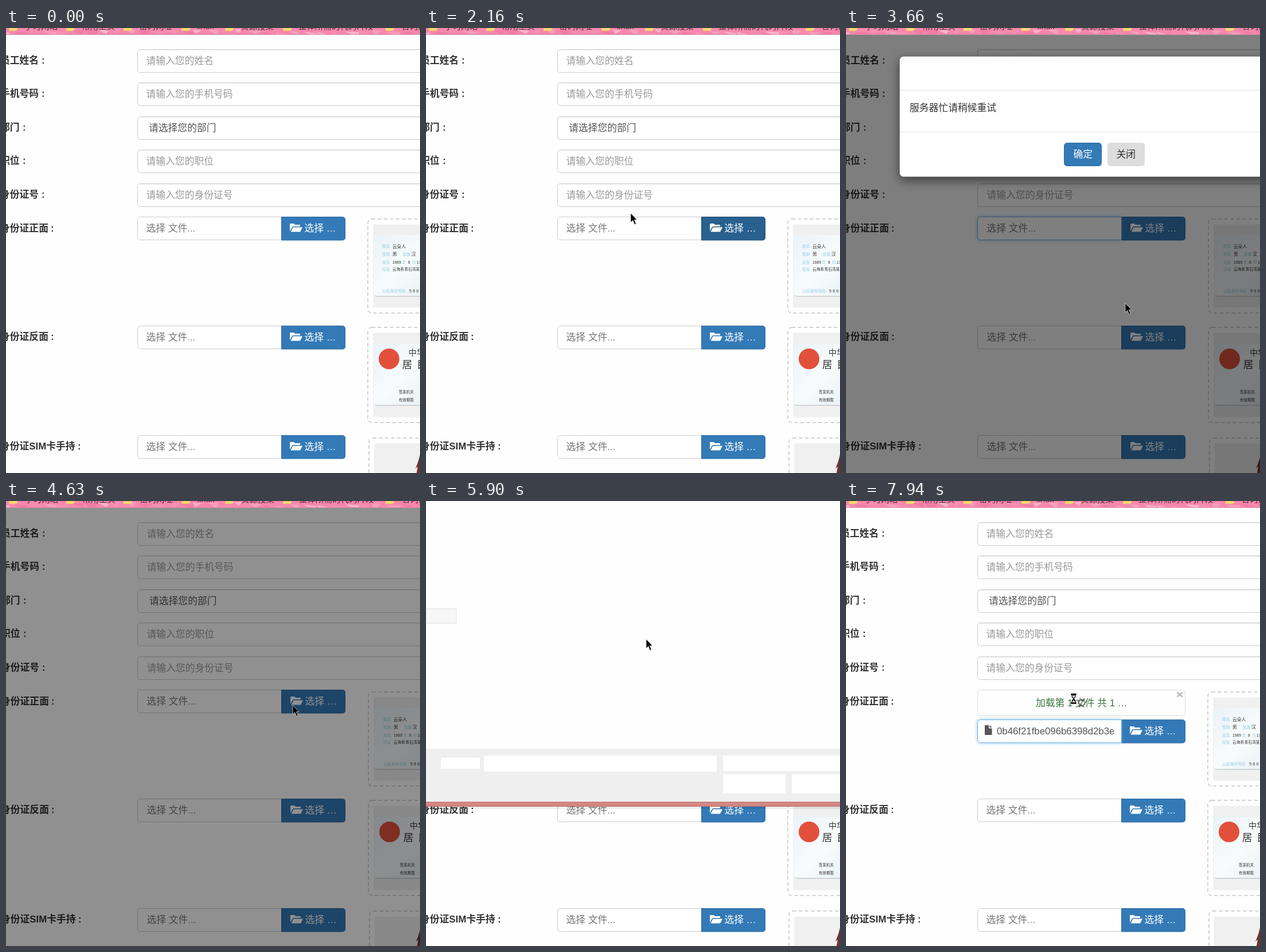
An HTML page that plays this animation: 722x776 px, repeating every 8 s.

```html
<!DOCTYPE html>
<html lang="zh-CN">
<head>
<meta charset="utf-8">
<style>
  html, body { margin: 0; width: 100%; height: 100%; overflow: hidden; background: #fefefe; }
  svg { display: block; width: 722px; height: 776px; }
  text { font: 16.8px "Liberation Sans", "Noto Sans CJK SC", "Noto Sans CJK", sans-serif; white-space: pre; }
  .label { font-weight: bold; fill: #333; }
  .field { fill: #fff; stroke: #ccc; }
  .focus { stroke: #66afe9; filter: drop-shadow(0 0 3px #66afe9aa); }
  .btn { fill: #337ab7; stroke: #2e6da4; }
  .btn.on { fill: #286090; stroke: #204d74; }
  .dim text, .dim .thumb, .dim .icon { transform: translateX(1px); }
</style>
</head>
<body>
<svg id="stage" viewBox="0 0 722 776"></svg>
<script>
const stage = document.getElementById('stage');
const $ = id => document.getElementById(id);

const text = (x, y, s, fill, size = 16.8, extra = '') =>
  `<text x="${x}" y="${y}" fill="${fill}" style="font-size:${size}px" ${extra}>${s}</text>`;
const rect = (x, y, w, h, fill, extra = '') =>
  `<rect x="${x}" y="${y}" width="${w}" height="${h}" fill="${fill}" ${extra}/>`;

// The colon sits apart from the words, as a full-width sign does
const label = (y, s, colon) =>
  `<text class="label" x="-10" y="${y}">${s}</text><text class="label" x="${colon - 4}" y="${y}">:</text>`;

const inputRow = (y, name, colon, hint, x = 244.5, fill = '#999') =>
  label(y + 25, name, colon) +
  `<rect class="field" x="229.5" y="${y + .5}" width="520" height="40" rx="5"/>
   <path d="M233 ${y + 1.5}H722" stroke="#eee"/>` +
  text(x, y + 25.5, hint, fill);

const folder = y => `<path class="icon" fill="#fff" d="M495 ${y + 25}v-12q0-1 1-1h6l2 2h8q1 0 1 1v2h-12q-1 0-2 1z
  M500.5 ${y + 18.5}h16.5l-4 8h-16.5z"/>`;

const fileBox = (y, id) => `<g id="row${id}">
  <path id="btn${id}" class="btn" d="M480.5 ${y + .5}H586.5q5 0 5 5v30.500q0 5-5 5H480.5z"/>
  <path id="field${id}" class="field" d="M480 ${y + .5}H234.5q-5 0-5 5v30q0 5 5 5H480"/>
  <path id="edge${id}" d="M480.500 ${y}v41" stroke="#2e6da4"/>
  <g id="hint${id}">${text(244.5, y + 26, '选择 文件...', '#777')}</g>
  ${folder(y)}${text(520.5, y + 26, '选择 …', '#fff')}</g>`;

const thumb = (x, y, h, body) => `<g class="thumb">
  <rect x="${x + 1}" y="${y + 1}" width="200" height="${h}" rx="7" fill="#fff" stroke="#d2d2d2" stroke-width="2" stroke-dasharray="6 4.5"/>
  ${rect(x + 10, y + 10.5, 100, h - 19, '#f0f0f0')}${body}</g>`;

const card = y => rect(642, y + 1, 110, 107, '#cfd4d6', 'rx="6"') +
  rect(641, y, 110, 106, 'url(#card)', 'rx="6"');

const small = (y, size, ...parts) => parts.map(([x, s, blue]) =>
  text(x, y, s, blue ? '#8ccbe0' : '#333', size, 'font-weight="bold"')).join('');

function topBar() {
  let seed = 7, tiles = '';
  const random = () => (seed = seed * 16807 % 2147483647) / 2147483647;
  for (let x = -10; x < 722; x += 24) {
    const color = ['#fdb3ca', '#f47ba6', '#fa9dbd', '#f78fb2'][random() * 4 | 0];
    tiles += `<path fill="${color}" d="M${x} ${random() * 8}l${14 + random() * 14} ${random() * 4}l-${random() * 12} ${5 + random() * 7}z"/>`;
  }
  const marks = [[5, '学习网站'], [105, '常用主页'], [205, '密码网址'], [306, 'linux'],
    [382, '资源搜集'], [483, '整体所需的代码片段'], [662, '名词讲解']];
  const items = marks.map(([x, s]) => `<path d="M${x} -3h15v6l-3 2h-12z" fill="#f8d775" stroke="#e2b860" stroke-width=".6"/>` +
    text(x + 27, 1.5, s, '#4a3038', 14.5)).join('');
  return `<g clip-path="url(#bar)">${rect(0, 0, 722, 12, '#f887ae')}${tiles}${items}
    ${rect(0, 11, 722, 1, '#d98aa2')}</g>`;
}

const page = `<g id="page">${topBar()}
  ${inputRow(37, '员工姓名', 66, '请输入您的姓名')}
  ${inputRow(95, '手机号码', 66, '请输入您的手机号码')}
  ${inputRow(154, '部门', 33, '请选择您的部门', 249, '#555')}
  ${inputRow(212, '职位', 33, '请输入您的职位')}
  ${inputRow(271, '身份证号', 66, '请输入您的身份证号')}
  ${label(354.5, '身份证正面', 82)}${label(544, '身份证反面', 82)}${label(735, '身份证SIM卡手持', 129)}
  <g id="preview">
    <rect x="229.5" y="329.5" width="362" height="45" rx="5" fill="#fefefe" stroke="#ddd"/>
    ${text(331, 358, '加载第 1 文件 共 1 …', '#3c763d')}
    <path d="M577.5 333.5l9 8m0-8l-9 8" stroke="#bbb" stroke-width="2.6"/>
    <path d="M405.5 354a6 6 0 0 1 9-6.5m2 2.5a6 6 0 0 1-9 6.5M415 344v4.500h-4.500M407 360v-4.500h4.500" fill="none" stroke="#666" stroke-width="2"/>
  </g>
  ${fileBox(329, 1)}${fileBox(519, 2)}${fileBox(710, 3)}
  <g id="file">
    <path d="M242 391h7v5.500h5.500v11.500h-12.500zM250.500 391l4 4h-4z" fill="#555"/>
    <g clip-path="url(#name)">${text(263, 407, '0b46f21fbe096b6398d2b3e', '#555')}</g>
  </g>
  ${thumb(630, 332, 164, card(361) +
    small(383, 6.8, [656, '姓名', 1]) + small(383.5, 7.8, [674, '云朵人']) +
    small(396.5, 6.8, [656, '性别', 1], [692, '民族', 1]) + small(397, 7.8, [674, '男'], [707, '汉']) +
    small(410.5, 6.8, [656, '出生', 1], [674, '1989'], [691, '年', 1], [701, '8'], [708, '月', 1], [716, '17']) +
    small(423, 6.8, [656, '住址', 1], [674, '云海系青石湾某']) +
    small(460.5, 6.8, [656, '公民身份号码', 1]) + small(460.5, 7.5, [703, '5 6 0 7']))}
  ${thumb(630, 521, 166, card(551) + '<circle cx="668" cy="577" r="18" fill="#e2503c"/>' +
    text(702, 571, '中华', '#333', 14, 'font-weight="bold"') +
    text(691, 593, '居 民', '#333', 17.5, 'font-weight="bold" word-spacing="4"') +
    small(636.5, 6.5, [685, '签发机关']) + small(650.5, 6.5, [685, '有效期限']))}
  ${thumb(632, 714, 164, '<path d="M722 744q-3 14-8 24l4-3-2 11h6z" fill="#6b3530"/>')}
</g>`;

const modal = `<g clip-path="url(#view)"><rect id="shade" y="12" width="722" height="764"/>
  <g id="modal">
    <rect x="93.500" y="49.500" width="750" height="210" rx="7" fill="#fff" stroke="#0003" style="filter:drop-shadow(0 6px 9px #0008)"/>
    <path d="M94 108.500H722M94 181.500H722" stroke="#e5e5e5"/>
    ${text(111, 145, '服务器忙请稍候重试', '#333')}
    ${rect(380.5, 200.5, 65, 40, '#337ab7', 'rx="5" stroke="#2e6da4"')}${text(396.5, 226, '确定', '#fff')}
    ${rect(456, 200, 65, 41, '#ddd', 'rx="5" id="close"')}${text(471.5, 226, '关闭', '#333')}
  </g></g>`;

const dialog = `<g id="dialog">
  ${rect(0, 533, 722, 4, '#0001')}${rect(0, 0, 722, 525, '#fefefe')}
  ${rect(-1, 188, 54, 25, '#f7f7f7', 'stroke="#ddd"')}
  ${rect(0, 432, 722, 93, '#efefef')}
  ${rect(26, 447.5, 68, 19.5, '#fff', 'id="blank"')}
  ${rect(101, 444, 406, 28, '#fff')}${rect(518, 444, 204, 27, '#fff')}
  ${rect(518, 476.5, 108.5, 33.5, '#fff')}${rect(638, 476.5, 84, 33.5, '#fff')}
  ${rect(0, 525, 722, 8, '#d58782')}<path d="M0 525H722M0 532.500H722" stroke="#b56a66"/>
  <g id="words">${text(26, 463, '文件名(N):', '#222', 14.5)}${text(545, 498.5, '打开(O)', '#222', 14.5)}${text(666, 498.5, '取消', '#222', 14.5)}</g>
  ${rect(104, 448, 1, 19, '#000', 'id="caret"')}
</g>`;

const pointer = `<path id="arrow" d="M0 0V16L3.700 12.500L6.800 19.500L9.300 18.500L6.300 11.600H11Z" fill="#000" stroke="#fff" stroke-width=".6"/>
  <g id="wait" stroke="#fff" stroke-width=".5">
    <path d="M392 335.500h10v3h-1q0 4-3 6q3 3 3 6.500h1v3h-10v-3h1q0-3.500 3-6.500q-3-2-3-6h-1z"/>
    <path d="M394.500 339.500h5l-2.500 4zM397 347.500l2.500 3.500h-5z" fill="#fff"/></g>`;

stage.innerHTML = `<defs>
  <linearGradient id="card" x2="1" y2="1"><stop stop-color="#e9f3f8"/><stop offset=".5" stop-color="#f8fbfc"/><stop offset="1" stop-color="#e6f0f4"/></linearGradient>
  <clipPath id="bar"><path d="M0 0H722V12H0z"/></clipPath>
  <clipPath id="view"><path d="M0 12H722V776H0z"/></clipPath>
  <clipPath id="name"><path d="M260 380H467V424H260z"/></clipPath>
  </defs>${page}${modal}${dialog}${pointer}`;

// Pointer stops: time, x, y
const route = [[130, 660, 735], [890, 588, 350], [1510, 588, 350], [1690, 470, 284], [1890, 357, 323],
  [2200, 357, 323], [2760, 440, 430], [3270, 478, 476], [3600, 487, 480], [3720, 487, 480],
  [4300, 488, 220], [4470, 488, 222], [4630, 500, 356], [4850, 540, 352], [5340, 540, 352],
  [5880, 384, 241], [6370, 384, 241], [6750, 397, 336], [8000, 397, 336]];

const ramp = (t, from, span) => Math.min(1, Math.max(0, (t - from) / span));
const within = (t, a, b) => t >= a && t < b;
const show = (id, on) => $(id).style.display = on ? '' : 'none';

function pointerAt(t) {
  const i = Math.max(1, route.findIndex(p => p[0] > t));
  const [a, b] = [route[i - 1], route[i]];
  const u = ramp(t, a[0], b[0] - a[0]), k = u * u * (3 - 2 * u);
  return [a[1] + (b[1] - a[1]) * k, a[2] + (b[2] - a[2]) * k];
}

function draw(t) {
  const shade = ramp(t, 3205, 150) - ramp(t, 4612, 150);
  const pop = ramp(t, 3355, 150) - ramp(t, 4462, 150);
  const slide = 1 - (1 - ramp(t, 3355, 300)) ** 2;
  const dialogAlpha = ramp(t, 920, 190) - ramp(t, 2030, 120) + ramp(t, 5690, 190) - ramp(t, 7430, 230);
  const loaded = t >= 7820;
  const focused = within(t, 2300, 4480) || loaded;
  const [x, y] = pointerAt(t);

  $('page').setAttribute('class', shade > 0 ? 'dim' : '');
  $('shade').setAttribute('opacity', shade / 2);
  $('modal').setAttribute('opacity', pop);
  $('modal').setAttribute('transform', `translate(0 ${-52 * (1 - slide) - 52 * ramp(t, 4462, 300)})`);
  $('close').setAttribute('fill', within(t, 4240, 4520) ? '#ccc' : '#ddd');

  $('dialog').setAttribute('opacity', dialogAlpha);
  const ready = within(t, 1270, 2200) || t >= 6020;
  show('words', ready);
  show('blank', !ready);
  show('caret', within(t, 1340, 1870) || within(t, 6430, 6960) || within(t, 7490, 8000));

  const hover = within(t, 800, 2300) || within(t, 4762, 5800);
  $('btn1').setAttribute('class', hover ? 'btn on' : 'btn');
  $('edge1').setAttribute('stroke', focused ? '#66afe9' : hover ? '#204d74' : '#2e6da4');
  $('field1').setAttribute('class', focused ? 'field focus' : 'field');
  $('row1').setAttribute('transform', `translate(0 ${loaded ? 52 : 0})`);
  show('hint1', !loaded);
  show('preview', loaded);
  show('file', loaded);

  show('arrow', t >= 130 && !loaded);
  show('wait', loaded);
  $('arrow').setAttribute('transform', `translate(${x} ${y})`);
}

function tick() {
  draw(performance.now() % 8000);
  requestAnimationFrame(tick);
}
tick();
</script>
</body>
</html>
```
